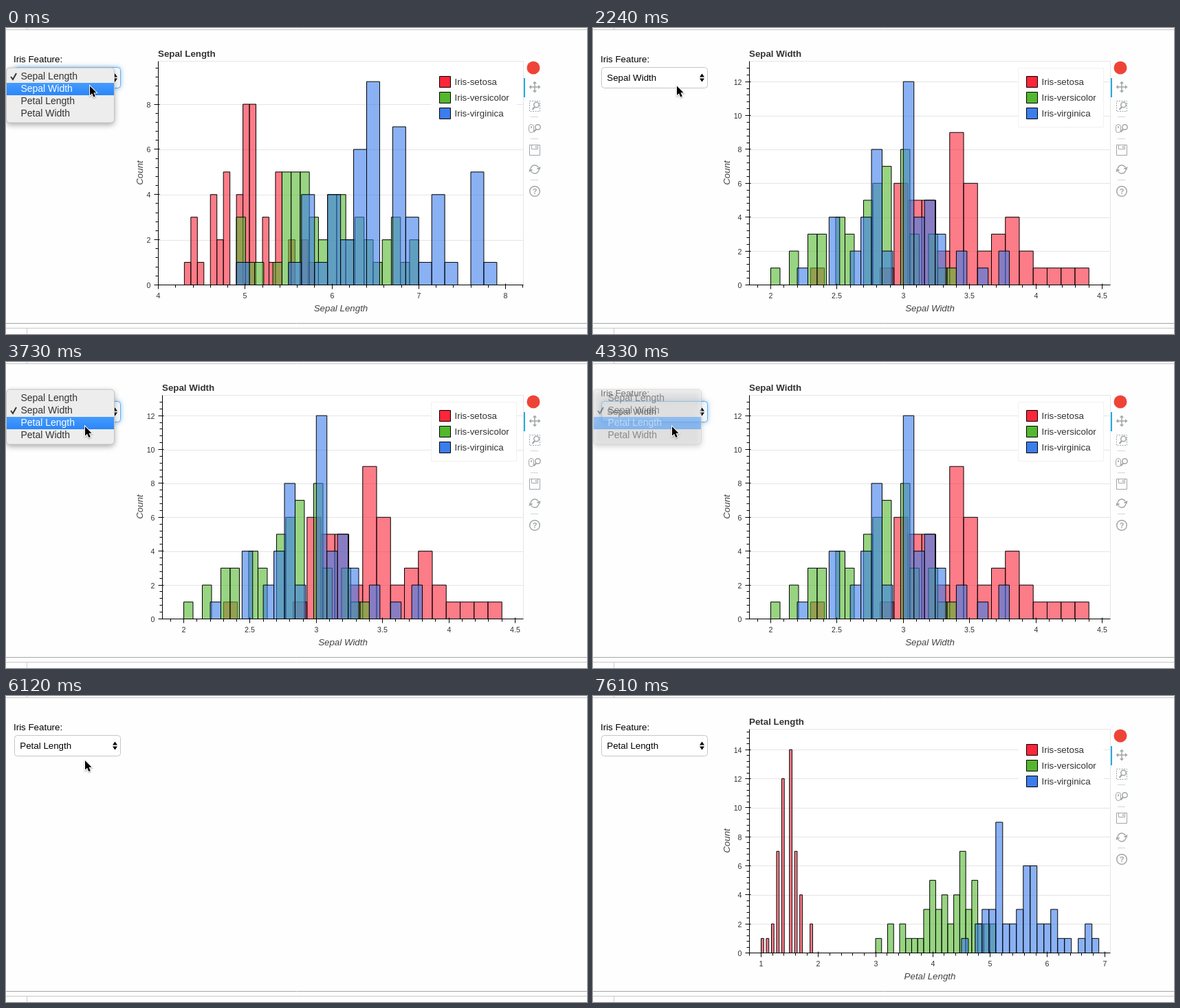
An HTML page with a canvas that plays this animation: 845 px wide and 446 px high, repeating every 8060 ms.

```html
<!DOCTYPE html>
<html lang="en">
<head>
<meta charset="utf-8">
<title>Iris histograms</title>
<style>
html, body { margin: 0; height: 100%; overflow: hidden; background: #fefefe; }
canvas { display: block; }
</style>
</head>
<body>
<canvas id="stage" width="845" height="446"></canvas>
<script>
const ctx = document.getElementById('stage').getContext('2d');
const LOOP = 8060;
const FONT = '"Liberation Sans", Arial, Helvetica, sans-serif';
const BASE = 374.5, TOP = 48.5, RIGHT = 752.5;
const FEATURES = ['Sepal Length', 'Sepal Width', 'Petal Length', 'Petal Width'];
const SPECIES = [['Iris-setosa', '#fb2639'], ['Iris-versicolor', '#54b82f'], ['Iris-virginica', '#3c7dec']];

// Each series: first edge, last edge, counts in 20 equal bins (holes are empty bins).
const CHARTS = [
  { left: 221.5, ref: 4, refX: 221.5, scale: 126.25, step: 1, max: 9.9, series: [
    [4.3, 5.8, [1,3,1,,4,2,5,,4,8,8,,3,1,5,,2,,2,1]],
    [4.9, 7.0, [3,1,1,,1,5,5,5,3,2,4,4,2,3,2,1,2,3,1,2]],
    [4.9, 7.9, [1,,,,1,4,1,4,2,6,9,,7,3,1,4,1,,5,1]]] },
  { left: 227.5, ref: 2, refX: 258.5, scale: 192.8, step: .5, max: 13.2, edge: true, series: [
    [2.3, 4.4, [1,,,,,1,6,5,5,2,9,6,2,3,4,2,1,1,1,1]],
    [2.0, 3.4, [1,,2,,3,3,,4,3,,5,6,7,,8,3,,3,1,1]],
    [2.2, 3.8, [1,,,4,,2,4,8,2,,12,4,5,3,,2,,1,,2]]] },
  { left: 227.5, ref: 1, refX: 244.5, scale: 83.25, step: 1, max: 15.4, series: [
    [1.0, 1.9, [1,,1,,2,,7,,12,,,14,,7,,4,,,,2]],
    [3.0, 5.1, [1,,2,,2,1,1,1,3,5,3,4,2,4,7,3,5,2,2,2]],
    [4.5, 6.9, [1,,2,3,3,9,2,2,3,6,6,2,2,3,1,1,,1,2,1]]] }
];

// Timelines: [start, ...state]
const CHART_AT = [[0, 0], [2240, 1], [6120, -1], [6270, 2]];
const VALUE_AT = [[0, 0], [440, 1], [4480, 2]];
const FOCUS_AT = [[0, true], [590, false], [3130, true], [4620, false]];
const MENU_AT = [ // checked, hovered, opacity
  [0, 0, 1, 1], [300, 0, 1, .5], [440, 0, 0, 0], [3130, 1, 1, 1], [3580, 1, 2, 1],
  [4180, 1, -1, 1], [4330, 1, 2, .5], [4480, 0, 0, 0]];
const CURSOR_AT = [
  [0, 122, 84.5], [2690, 120, 83], [2830, 114, 76], [2980, 112, 74], [3430, 112, 76],
  [3580, 113, 88], [3730, 115, 94], [6720, 120, 97], [6870, 518, 320], [7170, 722, 425],
  [7320, 763, 441.5], [7470, 781, 444.5], [7610, -50, -50]];

const at = (list, t) => list.findLast(k => k[0] <= t).slice(1);

function line(color, width, ...points) {
  ctx.beginPath();
  for (let i = 0; i < points.length; i += 2) ctx.lineTo(points[i], points[i + 1]);
  ctx.strokeStyle = color;
  ctx.lineWidth = width;
  ctx.stroke();
}

function text(str, x, y, size, color = '#444', align = 'left', style = '') {
  ctx.font = `${style} ${size}px ${FONT}`;
  ctx.fillStyle = color;
  ctx.textAlign = align;
  ctx.fillText(str, x, y);
}

function box(x, y, w, h, fill, stroke, radius = 0) {
  ctx.beginPath();
  ctx.roundRect(x, y, w, h, radius);
  if (fill) { ctx.fillStyle = fill; ctx.fill(); }
  if (stroke) { ctx.strokeStyle = stroke; ctx.lineWidth = 1; ctx.stroke(); }
}

function poly(fill, ...points) {
  ctx.beginPath();
  for (let i = 0; i < points.length; i += 2) ctx.lineTo(points[i], points[i + 1]);
  ctx.closePath();
  ctx.fillStyle = fill;
  ctx.fill();
}

function arc(x, y, r, from = 0, to = 2 * Math.PI, color = '#a1a6a9', width = 1.5) {
  ctx.beginPath();
  ctx.arc(x, y, r, from, to);
  ctx.strokeStyle = color;
  ctx.lineWidth = width;
  ctx.stroke();
}

// Five minor ticks per major step; calls mark(value, isMajor).
function ticks(min, max, step, mark) {
  const minor = step / 5;
  for (let k = Math.ceil(min / minor - 1e-6); k * minor <= max; k++)
    mark(+(k * minor).toFixed(2), k % 5 === 0);
}

function drawChart(index) {
  const { left, ref, refX, scale, step, max, edge, series } = CHARTS[index];
  const px = v => refX + (v - ref) * scale;
  const py = n => BASE - n * (BASE - TOP) / max;
  const mid = (left + RIGHT) / 2;

  box(left, TOP, RIGHT - left, BASE - TOP, '#fff', '#e5e5e5');
  for (let n = 2; n < max; n += 2) {
    const y = Math.round(py(n)) + .5;
    line('#e5e5e5', 1, left, y, RIGHT, y);
  }

  series.forEach(([lo, hi, counts], s) => {
    const w = (hi - lo) / 20 * scale;
    counts.forEach((n, i) => {
      const x = px(lo) + i * w, y = py(n);
      ctx.globalAlpha = .6;
      box(x, y, w, BASE - y, SPECIES[s][1]);
      ctx.globalAlpha = 1;
      box(x, y, w, BASE - y, null, '#000');
    });
  });

  line('#000', 1, left, TOP, left, BASE, RIGHT, BASE);
  ticks(0, max, 2, (v, major) => {
    const y = Math.round(py(v) - .5) + .5;
    line('#000', 1, left - (major ? 6 : 4), y, left + (major ? 2 : 0), y);
    if (major) text(v, left - 11, y + 4, 10.67, '#333', 'right');
  });
  ticks(ref - (refX - left) / scale, ref + (RIGHT - refX) / scale, step, (v, major) => {
    const x = Math.round(px(v) - .5) + .5;
    line('#000', 1, x, BASE - (major ? 2 : 0), x, BASE + (major ? 6 : 4));
    if (major) text(v, x, 394, 10.67, '#333', 'center');
  });

  text(FEATURES[index], left - .5, 41.5, 13.33, '#333', 'left', 'bold');
  text(FEATURES[index], mid, 412.5, 13.33, '#444', 'center', 'italic');
  ctx.save();
  ctx.translate(199, 211);
  ctx.rotate(-Math.PI / 2);
  text('Count', 0, 0, 13.33, '#444', 'center', 'italic');
  ctx.restore();

  box(618.5, 58.5, 124, 86, 'rgba(255,255,255,.95)', edge && '#f1f1f1');
  SPECIES.forEach(([name, color], i) => {
    box(630.5, 70.5 + 23 * i, 16, 16, color, '#000');
    text(name, 652.5, 82.5 + 23 * i, 13.33, '#333');
  });
  drawToolbar();
}

function lens(x, y) {
  arc(x, y, 3.7);
  line('#a1a6a9', 2, x - 2.5, y + 3, x - 6, y + 7);
}

function drawToolbar() {
  const grey = '#a1a6a9';
  ctx.beginPath();
  ctx.arc(767, 58, 9.5, 0, 7);
  ctx.fillStyle = '#ee4438';
  ctx.fill();
  box(753, 73, 2, 28, '#26aae1');
  for (const y of [129.5, 161.5, 221.5]) line('#d5d5d5', 1, 763, y, 774, y);

  // pan
  for (let i = 0; i < 4; i++) {
    ctx.save();
    ctx.translate(769, 86);
    ctx.rotate(i * Math.PI / 2);
    line(grey, 1.5, 0, 0, 0, -6);
    poly(grey, 0, -8.5, 3, -5, -3, -5);
    ctx.restore();
  }
  // box zoom
  ctx.setLineDash([2, 1.5]);
  box(761.5, 106.5, 15, 15, null, grey);
  ctx.setLineDash([]);
  lens(771.5, 112);
  // wheel zoom
  box(760.5, 140.5, 7, 12, null, grey, 3.5);
  line(grey, 1.5, 764, 143, 764, 146);
  lens(773.5, 144.5);
  // save
  box(761.5, 170.5, 15, 15, null, grey);
  box(764.5, 170.5, 9, 6, null, grey);
  line(grey, 1.5, 771, 172, 771, 175);
  // reset
  arc(769, 206, 6, Math.PI * 1.05, Math.PI * 1.85);
  arc(769, 206, 6, Math.PI * .05, Math.PI * .85);
  poly(grey, 777.5, 202, 776.5, 207, 771.5, 205);
  poly(grey, 760.5, 210, 761.5, 205, 766.5, 207);
  // help
  arc(769, 238, 7.3);
  text('?', 769, 242, 11, grey, 'center', 'bold');
}

function drawPage() {
  box(0, 0, 845, 446, '#fefefe');
  line('#c4c4c4', 1, 0, 2.5, 845, 2.5);
  line('#ccc', 1, 30.5, 0, 30.5, 2);
  line('#a6a6a6', 1, 0, 430.5, 845, 430.5);
  line('#c8c8c8', 1, 0, 437.5, 845, 437.5);
  line('#ccc', 1, 30.5, 438, 30.5, 446);
}

function drawSelect(value, focus) {
  text('Iris Feature:', 11, 50, 13.33, '#000');
  ctx.save();
  if (focus) { ctx.shadowColor = 'rgba(102,175,233,.7)'; ctx.shadowBlur = 6; }
  box(12.5, 57.5, 154, 30, '#fff', focus ? '#66afe9' : '#c6c6c6', 4);
  ctx.restore();
  text(FEATURES[value], 20.3, 77, 13.33, '#000');
  poly('#000', 158.5, 66.5, 162, 71.5, 155, 71.5);
  poly('#000', 158.5, 78.5, 162, 73.5, 155, 73.5);
}

function drawMenu(checked, hovered, opacity) {
  if (!opacity) return;
  const top = 58 - 18 * checked;
  ctx.save();
  ctx.globalAlpha = opacity;
  ctx.save();
  ctx.shadowColor = 'rgba(0,0,0,.35)';
  ctx.shadowBlur = 9;
  ctx.shadowOffsetY = 3;
  box(.5, top, 157, 80, '#ededed', null, 5);
  ctx.restore();
  box(.5, top, 157, 80, null, '#c4c4c4', 5);
  FEATURES.forEach((name, i) => {
    const y = top + 4 + 18 * i, hot = i === hovered;
    if (hot) {
      const blue = ctx.createLinearGradient(0, y, 0, y + 18);
      blue.addColorStop(0, '#459bfd');
      blue.addColorStop(1, '#2a86f8');
      box(1, y, 156, 18, blue);
    }
    const color = hot ? '#fff' : '#333';
    if (i === checked) line(color, 2, 7, y + 9, 10, y + 13, 15, y + 4);
    text(name, 21.4, y + 13, 14, color);
  });
  ctx.restore();
}

function drawCursor(x, y) {
  const arrow = new Path2D('M0 0V13.6L3.1 10.7 5.4 16 7.8 15 5.5 9.8H9.6Z');
  ctx.save();
  ctx.translate(x, y);
  ctx.shadowColor = 'rgba(0,0,0,.35)';
  ctx.shadowBlur = 2;
  ctx.shadowOffsetY = 1;
  ctx.strokeStyle = '#fff';
  ctx.lineWidth = 2;
  ctx.stroke(arrow);
  ctx.shadowColor = 'transparent';
  ctx.fillStyle = '#000';
  ctx.fill(arrow);
  ctx.restore();
}

function draw(now) {
  const t = now % LOOP;
  const [chart] = at(CHART_AT, t);
  drawPage();
  if (chart >= 0) drawChart(chart);
  drawSelect(at(VALUE_AT, t)[0], at(FOCUS_AT, t)[0]);
  drawMenu(...at(MENU_AT, t));
  drawCursor(...at(CURSOR_AT, t));
}

const start = performance.now();
function tick() {
  draw(performance.now() - start);
  requestAnimationFrame(tick);
}
tick();
</script>
</body>
</html>
```
